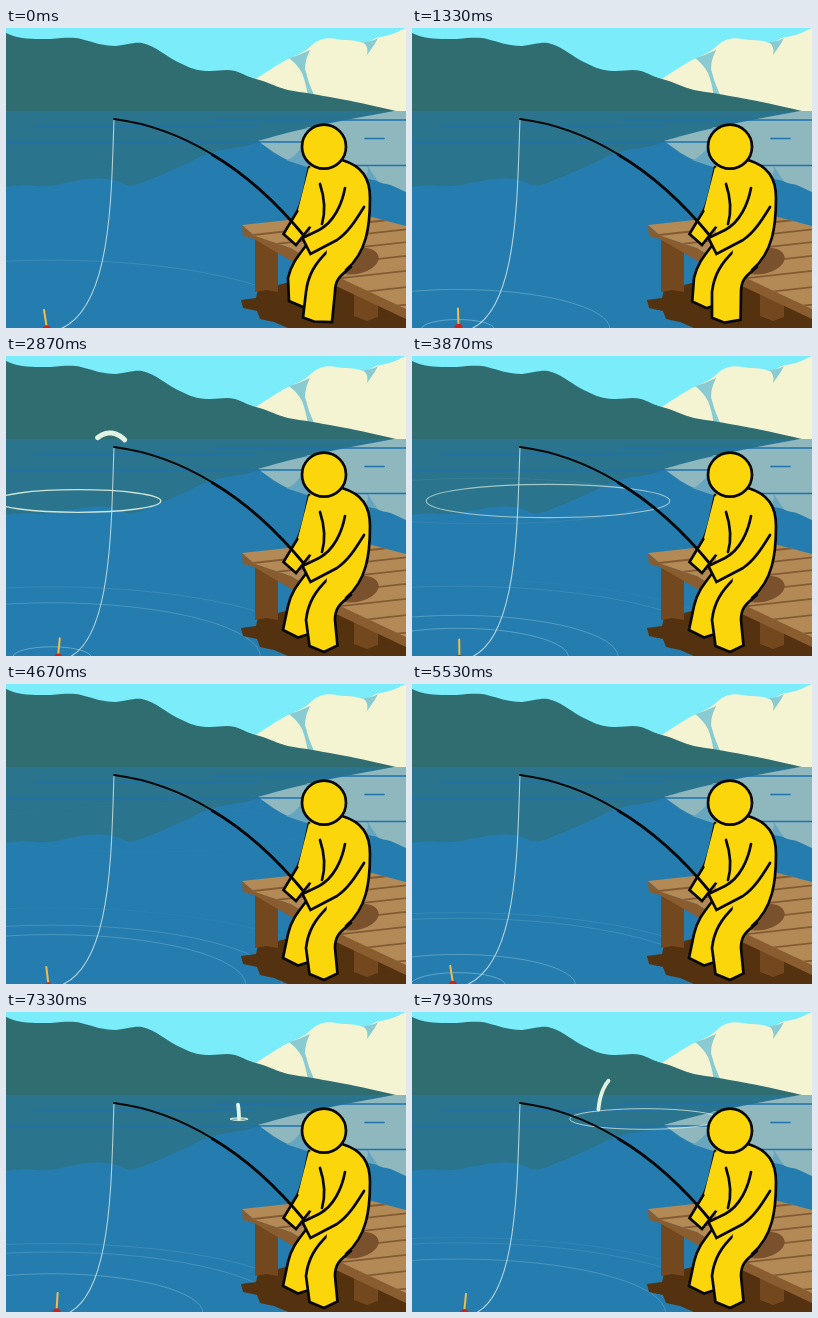
These frames come from a looping animation (400 by 300 pixels, 8 s). An HTML page with a canvas:

```html
<!DOCTYPE html>
<html lang="en">
<head>
<meta charset="utf-8">
<title>Fishing at the lake</title>
<style>
  html, body { margin: 0; width: 100%; height: 100%; overflow: hidden; background: #257cae; }
  canvas { display: block; width: 400px; height: 300px; }
</style>
</head>
<body>
<canvas id="stage" width="400" height="300"></canvas>
<script>
const ctx = document.getElementById('stage').getContext('2d');
const LOOP = 8;
const SWAY = 16 / 3;
const YELLOW = '#fad60a';
const INK = '#080808';

function fill(d, color) {
  ctx.fillStyle = color;
  ctx.fill(new Path2D(d));
}

function stroke(d, color, width) {
  ctx.strokeStyle = color;
  ctx.lineWidth = width;
  ctx.stroke(new Path2D(d));
}

function limb(d) {
  fill(d, YELLOW);
  stroke(d, INK, 2.7);
}

function ellipse(x, y, rx, ry, color, width, alpha) {
  ctx.globalAlpha = alpha;
  ctx.strokeStyle = color;
  ctx.lineWidth = width;
  ctx.beginPath();
  ctx.ellipse(x, y, rx, ry, 0, 0, Math.PI * 2);
  ctx.stroke();
  ctx.globalAlpha = 1;
}

const easeOut = p => 1 - (1 - p) ** 2;
const smooth = p => p * p * (3 - 2 * p);
const mix = (a, b, p) => a + (b - a) * p;

function drawLandscape() {
  fill('M0 0H400V84H0Z', '#7aecfa');
  fill('M248 52C262 43 274 35 284 30C294 26 300 23 306 17C312 11 322 9 330 11C340 13 348 11 357 15C364 15 368 10 373 9C386 8 392 3 400 0V84H248Z', '#f4f3d2');
  fill('M283 30Q294 27 304 22Q299 32 299 41Q302 54 308 67L302 69Q300 55 296 45Q291 36 283 30Z', '#8acbd2');
  fill('M357 14Q366 14 372 10Q369 16 366 20L361 27Q363 19 357 14Z', '#8acbd2');
  fill('M0 5C14 12 28 11 45 11C58 10 66 9 75 11C87 14 96 18 110 18C121 17 127 14 136 15C150 18 160 29 176 36C188 42 194 43 204 43C214 43 220 41 229 43C238 46 242 49 250 51C262 54 270 59 282 62C312 67 345 72 390 83H0Z', '#306d70');

  fill('M0 83H400V300H0Z', '#257cae');
  fill('M0 83H388C346 91 306 97 254 113C246 117 240 118 228 120C214 121 205 125 196 128C178 137 162 144 148 150C138 153 130 159 120 157C108 151 96 149 82 151C62 153 46 160 30 158Q14 156 0 159Z', '#2b748d');
  fill('M400 83H388C346 91 298 99 252 113C264 122 274 129 284 133C304 140 340 150 357 150C366 148 372 155 380 156C388 157 394 162 400 164Z', '#8fb8be');
  fill('M280 132Q292 128 296 116Q300 107 301 99H308Q300 112 299 122L304 140Z', '#68a6c0');
  fill('M357 150Q364 145 361 137Q367 146 372 153Z', '#68a6c0');

  stroke('M208 92H400M30 98H252M0 114H298M340 137.5H400M359 110.5H378', '#1f71aa', 1.6);
}

function drawRings(t) {
  for (const birth of [-2.63, 0.14, 1.08, 2.6, 3.05, 4.65, 5.2, 6.15]) {
    const p = (t - birth) / 4;
    if (p <= 0 || p >= 1) continue;
    const rx = 300 * easeOut(p);
    ellipse(46, 301, rx, rx * 0.26, '#8bc6dc', 1, 0.62 * (1 - p));
  }
}

const leaps = [
  { start: 2.41, x: 72, y: 145, span: 64, height: 68, reach: 168, width: 5 },
  { start: 7.27, x: 233, y: 107, span: -47, height: 45, reach: 115, width: 3.8 }
];
const AIR = 0.7;
const TRAIL = 30;

function drawSplash(leap, x, age) {
  const p = age / 1.6;
  if (p <= 0 || p >= 1) return;
  const rx = leap.reach * easeOut(p);
  const depth = leap.reach / 168;
  ellipse(x, leap.y, rx, rx * 0.137, '#e3f3e2', 0.5 + 1.2 * (1 - p) * depth, Math.min(1, 1.25 * (1 - p)));
}

function drawTrail(leap, age) {
  const head = age / AIR;
  if (head <= 0 || head >= 1.25) return;
  const at = p => [leap.x + leap.span * smooth(p), leap.y - leap.height * 4 * p * (1 - p)];
  let length = Math.max(0, head - 1) * AIR * 200;
  let p = Math.min(head, 1);
  let last = at(p);
  ctx.beginPath();
  ctx.moveTo(...last);
  while (p > 0 && length < TRAIL) {
    p = Math.max(0, p - 0.01);
    const next = at(p);
    length += Math.hypot(next[0] - last[0], next[1] - last[1]);
    ctx.lineTo(...next);
    last = next;
  }
  ctx.strokeStyle = '#e3f3e2';
  ctx.lineWidth = leap.width;
  ctx.stroke();
}

function drawLeaps(t) {
  for (const leap of leaps) {
    const age = t - leap.start;
    drawSplash(leap, leap.x, age);
    drawSplash(leap, leap.x + leap.span, age - AIR);
    drawTrail(leap, age);
  }
}

function drawPlanks() {
  const deck = 'M236 197L291 191L362 188L400 198V281L330 248L285 220L249 208Z';
  fill(deck, '#b38a56');
  ctx.save();
  ctx.clip(new Path2D(deck));
  for (let i = 0; i < 8; i++) {
    const x = 250 + 18 * i + i * i;
    const y = 207 + (x - 250) * 0.49;
    stroke(`M${x - 12} ${y + 1}L${x + 150} ${y - 17}`, '#835b32', 1.8);
  }
  ctx.fillStyle = '#7a512d';
  ctx.beginPath();
  ctx.ellipse(350, 233, 23, 13, -0.2, 0, Math.PI * 2);
  ctx.fill();
  ctx.restore();
}

function drawDock() {
  fill('M235 272L250 270L252 262L300 250L352 262L400 288V300H282L268 294L254 291L251 283L237 280Z', '#54310f');
  fill('M249 207L272 217V264L260 262L249 264Z', '#74481f');
  fill('M348 255L372 266V289L361 293L348 288Z', '#74481f');
  fill('M236 197L249 208L285 220L330 247L400 280V291L330 258L282 231L248 211L237 208Z', '#8a5d30');
  drawPlanks();
}

function drawAngler(t) {
  const s = (1 - Math.cos(Math.PI * Math.min(t / 2.8, 1))) / 2;
  const foot = points => points.map(([x0, y0, x1, y1]) => `L${mix(x0, x1, s)} ${mix(y0, y1, s)}`).join('');
  const leftFoot = foot([[283, 273, 277, 274], [297, 279, 292, 281.5], [300, 278, 303, 278]]);
  const rightFoot = foot([[297, 289.5, 303.5, 290], [308, 293.5, 318, 296], [326, 294, 331.5, 289.5]]);

  limb(`M302 215C292 228 285 236 282 250${leftFoot}L308 250L324 222`);
  fill('M303 138L336 132C356 138 364 150 364 170C364 192 362 216 346 237L322 230L304 214Z', YELLOW);
  limb(`M323 222C309 235 302 247 300 264${rightFoot}L329 264C329 250 336 247 345 239`);
  fill('M322 210L360 205L346 237L331 247L320 232Z', YELLOW);
  stroke('M336 132C356 138 364 150 364 170C364 198 361 224 340 242', INK, 2.7);

  limb('M303 139C299 158 298 168 292 182L277.5 206L290 217L304 199');
  fill('M303 139L292 182L304 199L317 194Q320 178 314 156Z', YELLOW);
  stroke('M108 91C172 99 241 137 299 209', INK, 2);
  stroke('M206 126.5C241 147 271 175 299 209', INK, 2.8);
  fill('M317 190L337 160L359 178L338 211L310 222L304 208Z', YELLOW);
  limb('M339 160C336 176 328 194 313 202L296.5 210L304.5 226L331 212C343 204 351 190 358 179');
  stroke('M314 156C318 168 320 182 316 196', INK, 2.7);

  ctx.beginPath();
  ctx.arc(318, 118.7, 22, 0, Math.PI * 2);
  ctx.fillStyle = YELLOW;
  ctx.fill();
  ctx.strokeStyle = INK;
  ctx.lineWidth = 2.7;
  ctx.stroke();
}

function drawTackle(t) {
  const phase = t / SWAY * Math.PI * 2;
  const swing = -Math.cos(phase);
  const bob = -1.5 * Math.sin(phase);
  const x = 46.5 + 5.8 * swing;

  ctx.globalAlpha = 0.8;
  stroke(`M108 91C105 168 107 294 ${x + 3} 304`, '#d5e9e8', 1.1);
  ctx.globalAlpha = 1;

  stroke(`M${46 + 8 * swing} ${282 + bob}L${x} ${299 + bob}`, '#efbd48', 2);
  ctx.fillStyle = '#c9231d';
  ctx.beginPath();
  ctx.arc(x, 301.5 + bob, 4.3, 0, Math.PI * 2);
  ctx.fill();
}

function draw(t) {
  ctx.lineJoin = 'miter';
  ctx.lineCap = 'round';
  drawLandscape();
  drawRings(t);
  drawLeaps(t);
  drawDock();
  drawTackle(t);
  drawAngler(t);
}

const begin = performance.now();
function tick() {
  draw((performance.now() - begin) / 1000 % LOOP);
  requestAnimationFrame(tick);
}
tick();
</script>
</body>
</html>
```
